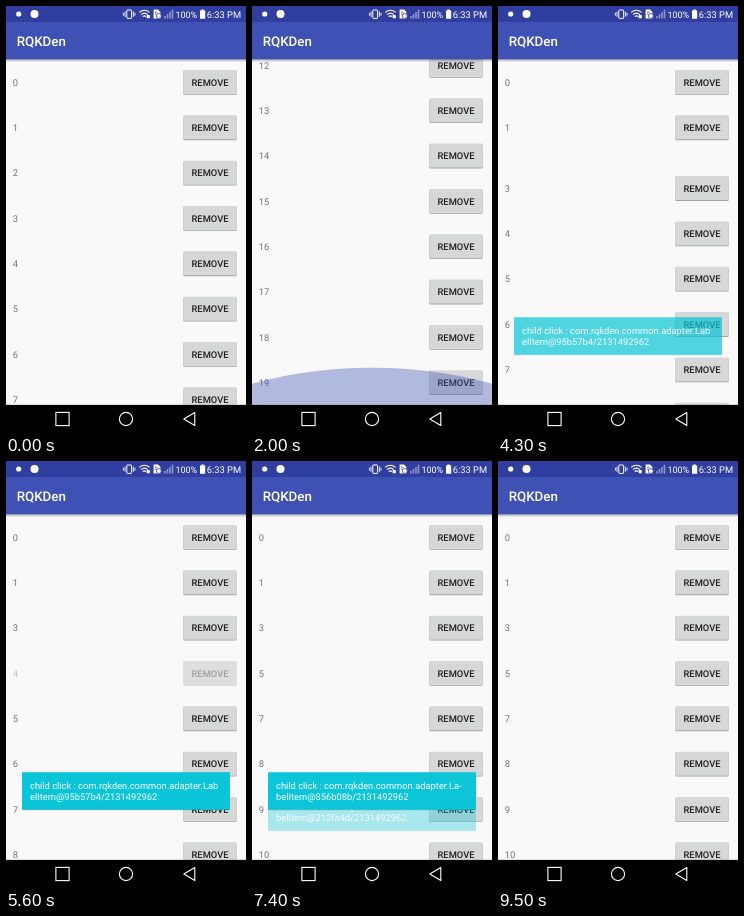
An HTML page that plays this animation: 240x427 px, repeating every 9.6 s.

```html
<!DOCTYPE html>
<html lang="en">
<head>
<meta charset="utf-8">
<title>List demo</title>
<style>
  html, body { margin: 0; width: 100%; height: 100%; overflow: hidden; background: #000; }
  svg { display: block; width: 100%; height: 100%; }
  text { font-family: Roboto, sans-serif; font-size: 9.33px; text-rendering: geometricPrecision; }
  .label { fill: #737373; }
  .btn { fill: #1f1f1f; font-weight: 500; text-anchor: middle; }
  .white { fill: #fff; }
  .line { fill: none; stroke: #fff; }
</style>
</head>
<body>
<svg viewBox="0 0 240 427" preserveAspectRatio="none">
  <defs>
    <linearGradient id="drop" x1="0" y1="0" x2="0" y2="1">
      <stop offset="0" stop-opacity=".3"/>
      <stop offset="1" stop-opacity="0"/>
    </linearGradient>
    <filter id="soft" x="-10%" y="-30%" width="120%" height="160%"><feGaussianBlur stdDeviation=".7"/></filter>
    <clipPath id="page"><rect y="53.33" width="240" height="345.6"/></clipPath>
  </defs>

  <rect width="240" height="427" fill="#f9f9f9"/>
  <g clip-path="url(#page)">
    <g id="list"></g>
    <ellipse id="topGlow" cx="120" rx="360" fill="#3f51b5"/>
    <ellipse id="endGlow" cx="120" rx="360" fill="#3f51b5"/>
  </g>

  <rect y="53" width="240" height="3.4" fill="url(#drop)"/>
  <rect width="240" height="53.33" fill="#3f51b5"/>
  <rect width="240" height="16" fill="#303f9f"/>
  <text class="white" x="10.67" y="39.8" style="font-size:13.33px;font-weight:500">RQKDen</text>

  <g id="status">
    <circle class="white" cx="12.7" cy="8" r="2.6"/>
    <circle class="white" cx="28.5" cy="8" r="4"/>
    <rect class="line" x="120.8" y="4" width="4.8" height="8.4" rx=".6"/>
    <path class="line" d="M119 5.6v5.2M117.4 6.8v2.8M127.4 5.6v5.2M129 6.8v2.8" stroke-width=".9"/>
    <path class="line" d="M133.2 6.4q5.2-4.3 10.4 0M135 8.6q3.4-2.9 6.8 0M136.8 10.6q1.6-1.4 3.2 0" stroke-width="1.2"/>
    <rect class="white" x="140.6" y="9" width="3.2" height="3.2" rx=".5"/>
    <path class="white" d="M147.6 3.6h4.4l2.4 2.4v6.6h-6.8z"/>
    <circle cx="152.8" cy="10" r="2.5" fill="#fff" stroke="#303f9f" stroke-width=".8"/>
    <path d="M149 6.2h2.4M149 8.2h1.6" stroke="#303f9f" stroke-width=".8"/>
    <path d="M159 12.5v-2.4M161.5 12.5v-4.4M164 12.5v-6.6M166.5 12.5v-8.8" stroke="#fff" stroke-width="1.6" opacity=".45"/>
    <text class="white" x="169.4" y="11.8" style="font-size:9px">100%</text>
    <path class="white" d="M195.4 3.4h2.4v1h1.4v8.3h-5.2v-8.3h1.4z"/>
    <text class="white" x="200.8" y="11.8">6:33 PM</text>
  </g>

  <g id="toasts"></g>

  <rect y="398.9" width="240" height="28.1"/>
  <rect class="line" x="49.9" y="406.4" width="13.2" height="13.2" stroke-width="1.1"/>
  <circle class="line" cx="120" cy="413" r="6.6" stroke-width="1.1"/>
  <path class="line" d="M188.8 406.6v12.8L177.8 413z" stroke-width="1.1" stroke-linejoin="round"/>
</svg>

<script>
const LOOP = 9600, ROW = 45.333, TOP = 53.333, END = 398.9, COUNT = 20;
const MAX_SCROLL = COUNT * ROW - (END - TOP);
const $ = id => document.getElementById(id);

// Each tap removes one row and raises a toast that leaves later.
const taps = [
  { row: 2, press: 3860, click: 4030, leave: 5630, lines: ['Lab', 'elItem@95b57b4/2131492962'] },
  { row: 4, press: 5360, click: 5530, leave: 7030, lines: ['La-', 'belItem@212fa4d/2131492962'] },
  { row: 6, press: 6760, click: 6930, leave: 8880, lines: ['La-', 'belItem@856b08b/2131492962'] }
];

const ramp = (t, start, length) => Math.min(1, Math.max(0, (t - start) / length));
const easeInOut = p => (1 - Math.cos(Math.PI * p)) / 2;
const easeOut = (p, power) => 1 - (1 - p) ** power;

function add(parent, markup) {
  const g = document.createElementNS('http://www.w3.org/2000/svg', 'g');
  g.innerHTML = markup;
  return parent.appendChild(g);
}

function place(node, y, alpha) {
  node.setAttribute('transform', `translate(0 ${y.toFixed(3)})`);
  node.setAttribute('opacity', alpha);
  node.setAttribute('display', alpha > 0 ? 'inline' : 'none');
}

const rows = Array.from({ length: COUNT }, (_, i) => add($('list'), `
  <text class="label" x="6.67" y="26.3">${i}</text>
  <rect x="177.3" y="11.5" width="53.4" height="24" rx="1" opacity=".34" filter="url(#soft)"/>
  <rect x="177.3" y="10.67" width="53.4" height="24" rx="1" fill="#d6d7d7"/>
  <rect class="ink" x="177.3" y="10.67" width="53.4" height="24" rx="1" opacity="0"/>
  <text class="btn" x="204" y="26.3">REMOVE</text>`));

for (const tap of taps) {
  tap.ink = rows[tap.row].querySelector('.ink');
  tap.toast = add($('toasts'), `
    <rect x="16" y="311.8" width="208" height="37.4" rx=".8" opacity=".22" filter="url(#soft)"/>
    <rect x="16" y="311.3" width="208" height="37.4" rx=".8" fill="#0ac5d8"/>
    <text class="white" x="24" y="327.6">child click : com.rqkden.common.adapter.${tap.lines[0]}</text>
    <text class="white" x="24" y="338.9">${tap.lines[1]}</text>`);
}

function scrollAt(t) {
  const down = ramp(t, 1340, 560) ** 1.5;
  const up = ramp(t, 2340, 370) ** 1.4;
  return MAX_SCROLL * (down - up);
}

// Edge glow: a wide arc that swells on impact, then flattens and fades.
function glow(node, t, hit, edge, side) {
  const size = ramp(t, hit - 40, 40) * (1 - ramp(t, hit, 600)) ** 2;
  node.setAttribute('ry', 360 * size);
  node.setAttribute('cy', edge - side * 311.8 * size);
  node.setAttribute('opacity', .5 * size);
}

function draw(t) {
  const scroll = scrollAt(t);
  rows.forEach((row, i) => {
    let y = TOP + i * ROW - scroll, alpha = 1;
    for (const { row: gone, click } of taps) {
      if (i > gone) y -= ROW * easeInOut(ramp(t, click + 120, 250));
      if (i === gone) alpha = 1 - ramp(t, click, 120);
    }
    place(row, y, alpha);
  });

  glow($('endGlow'), t, 1928, END, -1);
  glow($('topGlow'), t, 2730, TOP, 1);

  for (const { press, click, leave, ink, toast } of taps) {
    ink.setAttribute('opacity', .14 * ramp(t, press, 100));
    const exit = ramp(t, leave, 560);
    const alpha = easeOut(ramp(t, click + 50, 480), 2) * (1 - exit);
    place(toast, 22 * easeOut(exit, 3), alpha);
  }
}

const start = performance.now();
function tick() {
  draw((performance.now() - start) % LOOP);
  requestAnimationFrame(tick);
}
tick();
</script>
</body>
</html>
```
